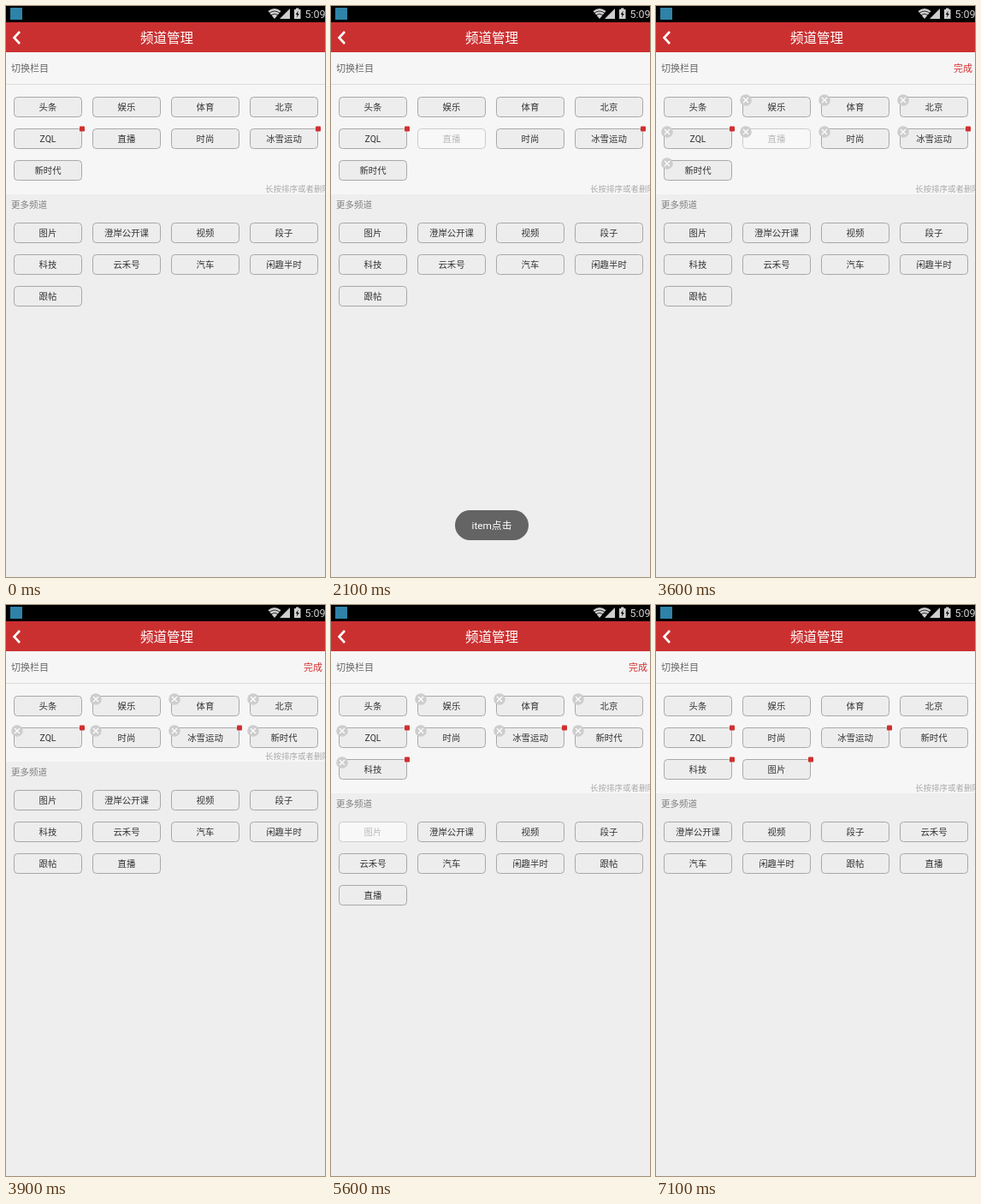
Write an HTML page that moves like this. It is 373 px wide and 667 px high and loops after 8000 ms.

```html
<!DOCTYPE html>
<html lang="zh-CN">
<head>
<meta charset="utf-8">
<title>频道管理</title>
<style>
  html, body { margin: 0; width: 100%; height: 100%; overflow: hidden; background: #eee; }
  svg { display: block; width: 373px; height: 667px; }
  text { font-family: Roboto, "Noto Sans CJK SC", "Noto Sans CJK", sans-serif; }
  .mid { text-anchor: middle; }
  .box { fill: #ededed; stroke: #a8a8a8; }
  .label { font-size: 10.4px; fill: #333; text-anchor: middle; }
  .pressed .box { fill: #f8f8f8; stroke: #cbcbcb; }
  .pressed .label { fill: #b9b9b9; }
  .drag .box { fill: #f7f7f7; }
  .drag .label { fill: #d23232; }
  .cross circle { fill: #cdcdcd; }
  .cross path { stroke: #fff; stroke-width: 1.3; }
  .dot { fill: #d03030; }
</style>
</head>
<body>
<svg viewBox="0 0 373 667">
  <rect width="373" height="667" fill="#eee"/>
  <rect id="panel" y="54" width="373" height="166" fill="#f6f6f6"/>
  <path d="M0 91.5H373" stroke="#dedada"/>

  <rect width="373" height="19"/>
  <rect x="5" y="2" width="14" height="14" fill="#2f83a8"/>
  <g fill="#cfcfcf">
    <path d="M314 15L306.5 6Q314 0 321.5 6Z"/>
    <path d="M308 8.2Q314 3.8 320 8.2M310 10.6Q314 7.8 318 10.6" fill="none" stroke="#000" stroke-width=".8"/>
    <path d="M332 3V15H320Z"/>
    <path d="M339 2.5H342.5V4H344.5V15H337V4H339Z"/>
    <path d="M341.7 5.5L338.8 10H340.6L339.8 13.5L342.8 9H341Z" fill="#000"/>
    <text x="349.5" y="14" font-size="12.5">5:09</text>
  </g>

  <rect y="19" width="373" height="35" fill="#cb3031"/>
  <path d="M16 30L9.5 37L16 44" fill="none" stroke="#fff" stroke-width="2.6"/>
  <text class="mid" x="188" y="37" dy=".37em" font-size="15.5" fill="#fff">频道管理</text>

  <text x="6" y="73" dy=".37em" font-size="11" fill="#666" font-weight="500">切换栏目</text>
  <text id="done" x="348" y="73" dy=".37em" font-size="11" fill="#d23232">完成</text>
  <g id="more">
    <text x="303" y="-6.5" dy=".37em" font-size="9.5" fill="#aaa">长按排序或者删除</text>
    <text x="6" y="12" dy=".37em" font-size="10.5" fill="#808080" font-weight="500">更多频道</text>
  </g>
  <g id="items"></g>
  <g id="toast">
    <rect x="145" y="589" width="86" height="35" rx="17.5" fill="#646464"/>
    <text class="mid" x="188" y="607" dy=".37em" font-size="11.8" fill="#fff">item点击</text>
  </g>
</svg>
<script>
const LOOP = 8000, STEP = 100;
const EDIT_ON = 2400, EDIT_OFF = 7100, DROP = 3000;
const $ = id => document.getElementById(id);

const start = {
  mine: ['头条', '娱乐', '体育', '北京', 'ZQL', '直播', '时尚', '冰雪运动', '新时代'],
  more: ['图片', '澄岸公开课', '视频', '段子', '科技', '云禾号', '汽车', '闲趣半时', '跟帖']
};
const moves = [
  { name: '直播', from: 3600, to: 3900 },
  { name: '科技', from: 4600, to: 5000 },
  { name: '图片', from: 5600, to: 6000 }
];
const dotted = ['ZQL', '冰雪运动', '科技', '图片'];

// Each tap sends a channel to the end of the other list.
function toggle({ mine, more }, name) {
  const without = list => list.filter(n => n !== name);
  return mine.includes(name)
    ? { mine: without(mine), more: [...more, name] }
    : { mine: [...mine, name], more: without(more) };
}
const layouts = [start];
for (const m of moves) layouts.push(toggle(layouts.at(-1), m.name));

const edge = layout => 109 + 37 * Math.ceil(layout.mine.length / 4);

function place(layout, name) {
  const own = layout.mine.indexOf(name);
  const i = own < 0 ? layout.more.indexOf(name) : own;
  const top = own < 0 ? edge(layout) + 45 : 118;
  return [49 + 92 * (i % 4), top + 37 * Math.floor(i / 4)];
}

const clamp = v => Math.min(1, Math.max(0, v));
const ease = v => .5 - Math.cos(Math.PI * clamp(v)) / 2;
const mix = (a, b, p) => a + (b - a) * p;
const show = (el, on) => el.setAttribute('visibility', on ? 'visible' : 'hidden');

// Channels that travel are drawn last, above the others.
const travels = n => moves.some(m => m.name === n);
const names = [...start.mine, ...start.more].sort((a, b) => travels(a) - travels(b));
const items = names.map(name => {
  const el = document.createElementNS('http://www.w3.org/2000/svg', 'g');
  el.innerHTML = `
    <rect class="box" x="-39.5" y="-11.5" width="79" height="23" rx="4"/>
    <text class="label" dy=".37em">${name}</text>
    <g class="cross" transform="translate(-36 -8)">
      <circle r="6.8"/><path d="M-3-3L3 3M3-3L-3 3"/>
    </g>
    <rect class="dot" x="37" y="-14.5" width="6" height="6" rx="1"/>`;
  $('items').append(el);
  return { name, el, cross: el.querySelector('.cross'), dot: el.querySelector('.dot') };
});

function render(t) {
  const k = moves.filter(m => t >= m.from).length;
  const now = layouts[k], before = layouts[Math.max(0, k - 1)];
  const move = moves[k - 1];
  const p = move ? ease((t - move.from) / (move.to - move.from)) : 1;
  const editing = t >= EDIT_ON && t < EDIT_OFF;
  const dragging = t >= EDIT_ON && t < DROP;
  const tapped = move && t < move.from + STEP ? move.name
    : t >= 2100 && t < EDIT_ON ? '直播' : null;

  for (const { name, el, cross, dot } of items) {
    const a = place(before, name), b = place(now, name);
    const lift = dragging && name === '直播' ? ease((t - 2300) / 300) : 0;
    const pressed = name === tapped;
    const shown = pressed && move ? before : now;
    const x = mix(a[0], b[0], pressed ? 0 : p) + 8.5 * lift;
    const y = mix(a[1], b[1], pressed ? 0 : p) + 2.5 * lift;
    const mine = shown.mine.includes(name);
    el.setAttribute('transform', `translate(${x} ${y}) scale(${1 + .18 * lift})`);
    el.setAttribute('class', pressed ? 'pressed' : lift ? 'drag' : '');
    show(cross, editing && mine && name !== '头条');
    show(dot, mine && dotted.includes(name));
  }

  const y = mix(edge(before), edge(now), p);
  $('panel').setAttribute('height', y - 54);
  $('more').setAttribute('transform', `translate(0 ${y})`);
  show($('done'), editing);
  const fade = t < 500 ? 0 : Math.min(clamp((t - 400) / 400), clamp((2700 - t) / 400));
  $('toast').setAttribute('opacity', fade);
}

function tick() {
  const t = performance.now() % LOOP;
  render(Math.floor(t / STEP) * STEP);
  requestAnimationFrame(tick);
}
tick();
</script>
</body>
</html>
```
